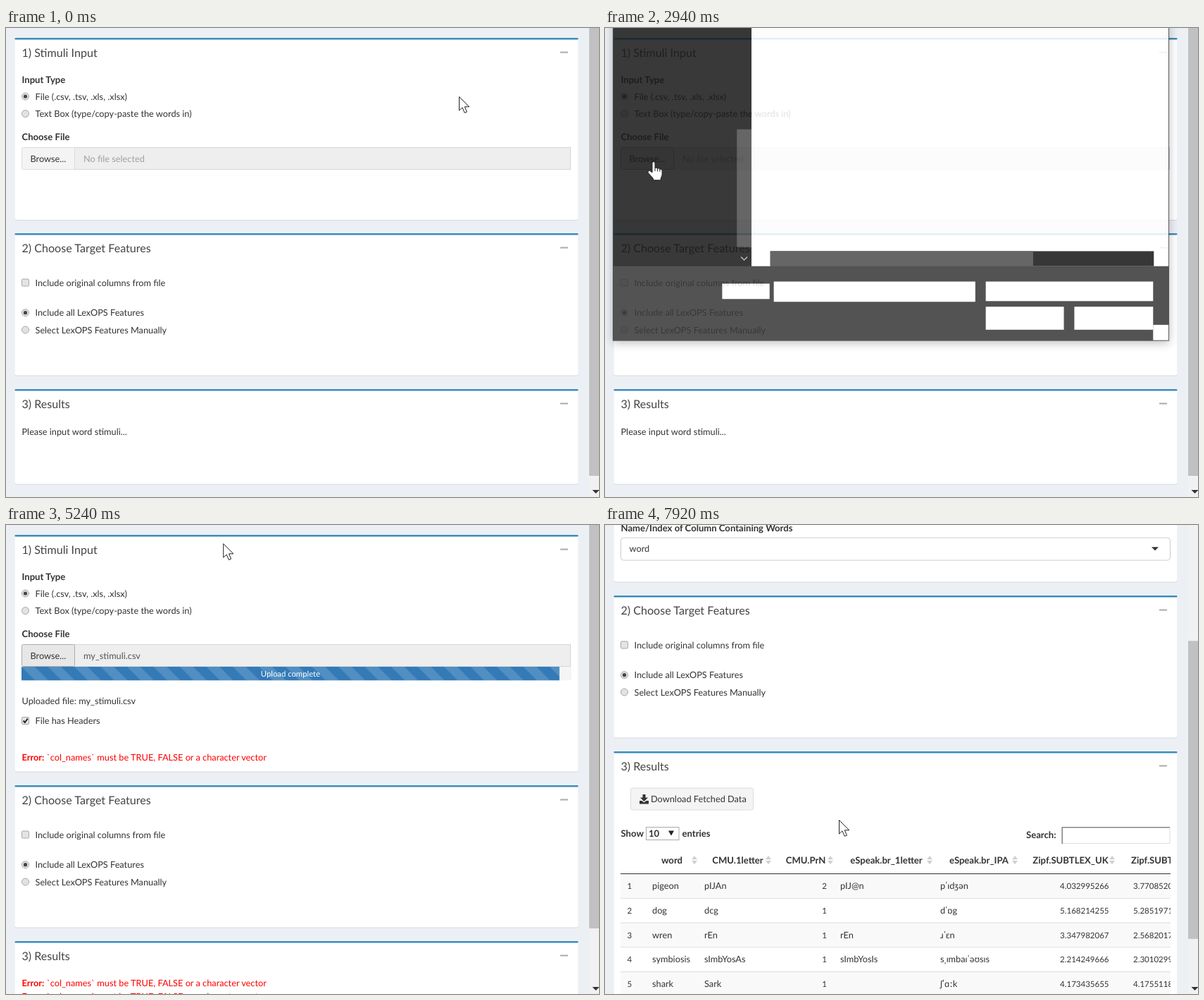
Animation, 842 px wide and 665 px high, one loop 8 s. Source, as an HTML page:

```html
<!DOCTYPE html>
<html lang="en">
<head>
<meta charset="utf-8">
<style>
  html, body { margin: 0; width: 100%; height: 100%; overflow: hidden; background: #ecf0f5; }
  #stage { display: block; width: 842px; height: 665px; font: 12.75px Lato, "Noto Sans", sans-serif; fill: #333; }
  text { text-rendering: geometricPrecision; white-space: pre; }
  .title { font-size: 16.1px; fill: #444; }
  .bold { font-weight: bold; font-size: 13.1px; }
  .small { font-size: 11.3px; fill: #fff; }
  .number { font-size: 11.5px; }
  .error { fill: #f00; }
  .dark { font: 14.4px "Open Sans", "Noto Sans", sans-serif; fill: #fff; }
</style>
</head>
<body>
<svg id="stage" viewBox="0 0 842 665"></svg>
<script>
const stage = document.getElementById('stage');
const LOOP = 8000;

// Moments at which the interface changes
const HOVER = 1330, BUSY = 2130, OPEN = 2785, PAINT = 3000, CLICK = 4190, CLOSE = 4390,
      UPLOAD = 4730, PARSED = 5010, READY = 5600, SCROLL = 6670, SCROLL_END = 7460;

const clamp = v => Math.max(0, Math.min(1, v));
const easeOut = (p, n = 2) => 1 - (1 - clamp(p)) ** n;

// y is the vertical middle of the capitals
const text = (x, y, s, cls = '', extra = '') =>
  `<text x="${x}" y="${y + (cls.includes('title') ? 5.9 : cls.includes('dark') ? 5.2 : 4.5)}" class="${cls}" ${extra}>${s}</text>`;
const rect = (x, y, w, h, fill, extra = '') =>
  `<rect x="${x}" y="${y}" width="${w}" height="${h}" fill="${fill}" ${extra}/>`;
const frame = (x, y, w, h, fill, stroke, extra = '') =>
  rect(x + .5, y + .5, w - 1, h - 1, fill, `stroke="${stroke}" ${extra}`);
const path = (d, fill, extra = '') => `<path d="${d}" fill="${fill}" ${extra}/>`;
const line = (d, color, width = 1, extra = '') => path(d, 'none', `stroke="${color}" stroke-width="${width}" ${extra}`);
const at = (x, y, body) => `<g transform="translate(${x} ${y})">${body}</g>`;
const END = 'text-anchor="end"', MID = 'text-anchor="middle"';

function radio(y, label, on) {
  return `<circle cx="27.5" cy="${y}" r="5" fill="#e2e2e2" stroke="#a6a6a6"/>` +
    (on ? `<circle cx="27.5" cy="${y}" r="2.6" fill="#444"/>` : '') + text(41.5, y, label);
}

function checkbox(y, label, on) {
  return frame(22, y - 5.5, 11, 11, '#e4e4e4', '#a6a6a6', 'rx="1.5"') +
    (on ? line(`M24.6 ${y}l2.2 2.5 4-5.5`, '#222', 2) : '') + text(41.5, y, label);
}

function panel(top, bottom, title, body) {
  return rect(12.5, top + 1, 800, bottom - top, '#d5d9de', 'rx="3"') +
    rect(12.5, top, 800, bottom - top, '#fff', 'rx="3"') +
    rect(12.5, top, 800, 2.5, '#3c8dbc', 'rx="1.2"') +
    text(22.5, top + 21, title, 'title') + rect(787, top + 19.5, 11, 2, '#aaa') + body;
}

const errorLine = y => text(22.5, y,
  '<tspan font-weight="bold">Error:</tspan> `col_names` must be TRUE, FALSE or a character vector', 'error');

function fileInput(t) {
  const hover = t > HOVER && t < READY, chosen = t >= CLOSE + 120;
  return text(22.5, 73.5, 'Input Type', 'bold') +
    radio(97, 'File (.csv, .tsv, .xls, .xlsx)', true) +
    radio(121.5, 'Text Box (type/copy-paste the words in)') +
    text(22.5, 154, 'Choose File', 'bold') +
    frame(97, 169, 705, 32, '#eee', '#d2d6de') +
    frame(22, 169, 76, 32, hover ? '#e7e7e7' : '#f4f4f4', hover ? '#adadad' : '#ddd', 'rx="2"') +
    text(34.5, 185, 'Browse...') +
    text(110, 185.5, chosen ? 'my_stimuli.csv' : 'No file selected', '', `fill="${chosen ? '#555' : '#a0a0a0'}"`);
}

function progress(t) {
  if (t < UPLOAD) return '';
  const w = 781 * easeOut((t - UPLOAD) / 600);
  return rect(22, 201, 781, 19.3, '#f5f5f5') +
    at(22, 201, rect(0, 0, w, 19.3, '#337ab7') + rect(0, 0, w, 19.3, 'url(#stripes)')) +
    (w > 90 ? text(22 + w / 2, 210, 'Upload complete', 'small', MID) : '');
}

function uploaded(t) {
  if (t < PARSED) return '';
  const head = text(22.5, 249.5, 'Uploaded file: my_stimuli.csv') + checkbox(277.5, 'File has Headers', true);
  if (t < READY) return head + errorLine(329.5);
  return head + text(22.5, 330, 'Name/Index of Column Containing Words', 'bold') +
    frame(22, 343.5, 781, 33, '#fff', '#ccc', 'rx="4"') + text(34.5, 359.5, 'word') +
    path('M776 357.3h10l-5 5z', '#333');
}

const headers = [['word', 95, 127], ['CMU.1letter', 188.5, 232], ['CMU.PrN', 285, 320],
  ['eSpeak.br_1letter', 399.5, 461], ['eSpeak.br_IPA', 531, 582], ['Zipf.SUBTLEX_UK', 661, 720]];
const rows = [
  ['pigeon', 'pIJAn', 2, 'pIJ@n', 'pˈɪdʒən', '4.032995266', '3.770852012'],
  ['dog', 'dcg', 1, '', 'dˈɒg', '5.168214255', '5.285197127'],
  ['wren', 'rEn', 1, 'rEn', 'ɹˈɛn', '3.347982067', '2.568201724'],
  ['symbiosis', 'sImbYosAs', 1, 'sImbYosIs', 'sˌɪmbaɪˈəʊsɪs', '2.214249666', '2.301029996'],
  ['shark', 'Sark', 1, '', 'ʃˈɑːk', '4.173435655', '4.175511803']];
const columns = [[67], [141], [315, 'number', END], [334], [476], [715.5, 'number', END], [750, 'number']];

// Coordinates relative to the top of the results panel
const results =
  frame(36, 51.5, 175, 32, '#f4f4f4', '#ddd', 'rx="3"') +
  path('M53.5 61h4v4.5h3.5l-5.5 5.5-5.5-5.5h3.5zM49 70h3.5l3 2.6 3-2.6H62v4.5H49z', '#333') +
  text(65, 67.5, 'Download Fetched Data') +
  text(22.5, 116.5, 'Show', 'bold') + frame(58, 107, 47.5, 19, '#fff', '#a9a9a9') +
  text(62, 116.5, '10', 'bold') + path('M90 112.5h8l-4 7z', '#222') +
  text(109.5, 116.5, 'entries', 'bold') + text(598, 118, 'Search:', 'bold') +
  rect(648.5, 107, 154, 24, '#fff') + line('M802 107v23.5H649', '#ddd') + line('M649.2 131V107.8H802', '#888', 1.6) +
  `<svg width="803" height="380">` +
  headers.map(([name, x, sort]) => text(x, 154, name, 'bold', MID) +
    path(`M${sort - 4} 153.2l4-5.2 4 5.2zM${sort - 4} 155l4 5.2 4-5.2z`, '#d0d0d0')).join('') +
  text(747, 154, 'Zipf.SUBTLEX_US', 'bold') +
  rows.map((row, i) => {
    const y = 173 + 34.75 * i;
    return rect(22, y, 781, 34.75, i % 2 ? '#fff' : '#f9f9f9') + rect(22, y, 781, 1, i ? '#ddd' : '#333') +
      text(31.5, y + 17.5, i + 1, 'number') +
      row.map((cell, c) => text(columns[c][0], y + 17.5, cell, ...columns[c].slice(1))).join('');
  }).join('') + '</svg>';

function page(t, scroll) {
  const [end1, top2] = t < PARSED ? [272, 291] : t < READY ? [349.5, 369] : [406.5, 426];
  const top3 = top2 + 221;
  const features = checkbox(top2 + 70, 'Include original columns from file') +
    radio(top2 + 112.7, 'Include all LexOPS Features', true) + radio(top2 + 137, 'Select LexOPS Features Manually');
  const output = t < PARSED
    ? text(22.5, top3 + 60.5, 'Please input word stimuli...', '', `opacity="${t > UPLOAD ? .35 : 1}"`)
    : t < READY ? errorLine(top3 + 59.5) + errorLine(top3 + 78) : at(0, top3, results);
  return at(0, -scroll,
    panel(14, end1, '1) Stimuli Input', fileInput(t) + progress(t) + uploaded(t)) +
    panel(top2, top2 + 201.5, '2) Choose Target Features', features) +
    panel(top3, t < READY ? top3 + 134.5 : top3 + 460, '3) Results', output));
}

function scrollbar(t, scroll) {
  const bottom = t < PARSED ? 635 : t < 5800 ? 572 : t < 6020 ? 533 : t < 6390 ? 496 : 394.5;
  const shift = scroll * .59;
  return rect(828, 0, 14, 665, '#f1f1f1') + rect(828, shift - 28, 14, bottom + 28, '#c1c1c1') +
    path('M832.5 655h10l-5 5z', '#333');
}

const icons = {
  pc: rect(5, 0, 13, 10, '#35a6e8', 'transform="skewY(8)"') + path('M0 13l9-3 8 4-8 3z', '#cfd8dd'),
  cube: path('M9 0l9 4v10l-9 4-9-4V4z', '#37b6e6') + path('M9 0l9 4-9 4-9-4z', '#a5e4f7') + path('M9 8l9-4v10l-9 4z', '#1583b8'),
  desktop: rect(0, 2, 18, 13, '#1a8fe8') + rect(0, 14, 18, 1.5, '#0c62b0'),
  document: path('M3 0h9l4 4v14H3z', '#f4f4f4') + line('M5 6h5M5 9h9M5 12h9M5 15h9', '#6b8ba8', 1.2),
  download: path('M6 1h6v7h5l-8 9-8-9h5z', '#2b95e6'),
  music: path('M8 0c1 4 6 4 5 10-1-3-2-3-3-4v8a4 3.4 0 1 1-2-3z', '#1c9df0'),
  picture: rect(0, 3, 18, 13, '#eee') + rect(1.5, 4.5, 15, 10, '#79bde8') + path('M1.5 14.5V11l5-3 10 4v2.5z', '#2e5f7c'),
  film: rect(1, 0, 17, 18, '#333') + line('M2.5 0v18M16.5 0v18', '#ddd', 1.6, 'stroke-dasharray="2"') +
    rect(4.5, 1, 10, 7, '#3b83bd') + rect(4.5, 10, 10, 7, '#d89b35'),
  drive: rect(1, 2, 8, 7, '#2ba5e0') + path('M0 11l6-2 12 4v3l-6 2-12-4z', '#c9cdd0'),
  network: '<circle cx="11" cy="7" r="7" fill="#46b4ea"/>' + path('M0 7l9 3v7l-9-3z', '#2785c4') + path('M8 2l5 2-1 5-5-3z', '#c4ecfb')
};
const places = [['cube', '3D Objects'], ['desktop', 'Desktop'], ['document', 'Documents'], ['download', 'Downloads'],
  ['music', 'Music'], ['picture', 'Pictures'], ['film', 'Videos'], ['drive', 'Lantern (C:)']];
const chevron = (x, y, color, w = 4) => line(`M${x - w / 2} ${y - 4}l${w} 4-${w} 4`, color, 1.5);
const chevronDown = (x, y, color, r = 4.5) => line(`M${x - r} ${y - r / 2}l${r} ${r} ${r}-${r}`, color, 1.5);

const tree = rect(8, 81, 175.5, 28.5, '#333') +
  chevronDown(21.5, 34, '#777') + at(40, 25, icons.pc) + text(62.5, 34, 'This PC', 'dark') +
  places.map(([icon, name], i) => {
    const y = 65 + 30.55 * i;
    return chevron(32, y, '#555') + at(49, y - 9, icons[icon]) + text(72.5, y, name, 'dark');
  }).join('') +
  chevron(21.5, 319.5, '#555') + at(40, 310, icons.network) + text(62.5, 319.5, 'Network', 'dark');

const shell = rect(7, -225, 798, 672, '#383838') + rect(8, -200, 200, 540, '#191919') +
  rect(185, 144, 21, 169, '#4d4d4d') + chevronDown(195.5, 329, '#aaa');
const hScroll = rect(233, 318.5, 550, 21.5, '#171717') + rect(233, 318.5, 377, 21, '#4d4d4d');

const unpainted = rect(206, -200, 598, 540, '#fff') + rect(205, 144, 1, 169, '#4d4d4d') + hScroll +
  [[164, 365, 68, 22], [238, 362, 289, 29], [542, 362, 240, 28], [542, 398, 112, 33], [669, 398, 113, 33], [782, 424, 22, 22]]
    .map(b => rect(...b, '#fff')).join('');

function painted(t) {
  const selected = t >= CLICK, over = t > 4060;
  let grip = '';
  for (let i = 0; i < 3; i++) for (let j = 0; j <= i; j++) grip += rect(799 - 4 * j, 434 + 4 * i, 2.5, 2.5, '#bbb');
  return tree + rect(208, -200, 1.5, 540, '#333') + rect(209.5, -200, 595, 540, '#202121') +
    rect(600, 0, 1, 3, '#666') + rect(772, 0, 1, 3, '#666') +
    (over ? rect(229, 10, 575, 28.5, selected ? '#777' : '#4d4d4d') : '') +
    rect(235, 16, 18, 18, '#1f7a48') + text(259.5, 25, 'my_stimuli.csv', 'dark', 'style="fill:#eee"') +
    text(608.5, 25, '8/4/2019 12:44 PM', 'dark', 'style="fill:#ddd"') +
    `<svg width="804" height="60">${text(781, 25, 'Table Text File', 'dark', 'style="fill:#ddd"')}</svg>` +
    rect(209, 318.5, 595, 21.5, '#171717') + hScroll +
    chevron(222, 329.5, '#aaa', -4) + chevron(792, 329.5, '#aaa') +
    text(165, 377, 'File name:', 'dark') + frame(238, 362, 289, 29, '#383838', '#eee') +
    (selected ? text(242, 377, 'my_stimuli.csv', 'dark') : '') + chevronDown(515, 376.5, '#ccc') +
    frame(542, 362, 240, 28.5, '#383838', '#a0a0a0') +
    `<svg width="757" height="400">${text(545.5, 377, 'Customised Files (*.text;*.txt;*.csv)', 'dark')}</svg>` +
    chevronDown(770, 376.5, '#ccc') +
    frame(543, 398.5, 111, 32, '#333', '#fff', 'stroke-width="1.8"') + text(598.5, 415, 'Open', 'dark', MID) +
    frame(670, 398.5, 111.5, 32, '#333', '#ccc', 'stroke-width="1.6"') + text(725, 415, 'Cancel', 'dark', MID) + grip;
}

function dialog(t) {
  const shown = t < CLOSE ? easeOut((t - OPEN) / 250) : 1 - easeOut((t - CLOSE) / 180);
  if (shown <= 0) return '';
  const scale = .93 + .07 * shown;
  return `<g opacity="${shown}" style="filter:drop-shadow(0 3px 7px rgba(0,0,0,.3))"
    transform="translate(406 110) scale(${scale}) translate(-406 -110)">${shell}${t < PAINT ? unpainted : painted(t)}</g>`;
}

// Pointer hotspot: time, x, y
const track = [[520, 643, 97], [640, 540, 140], [780, 380, 219], [980, 168, 205], [1260, 168, 205], [1390, 74.5, 194.5],
  [1950, 69, 189], [3320, 69, 189], [3500, 110, 300], [3640, 190, 364], [3900, 290, 150], [4140, 302, 29], [4800, 302, 29],
  [4960, 308, 25.5], [5240, 308, 25.5], [5800, 420, 349], [5830, 433.5, 370.5], [7640, 433.5, 370.5], [7720, 422, 309], [7920, 332, 418]];

function position(t) {
  const i = track.findIndex(k => k[0] > t);
  if (i < 1) return (i ? track[track.length - 1] : track[0]).slice(1);
  const [a, b] = [track[i - 1], track[i]], p = (t - a[0]) / (b[0] - a[0]);
  return [a[1] + (b[1] - a[1]) * p, a[2] + (b[2] - a[2]) * p];
}

const outline = 'stroke="#222" stroke-linejoin="round"';
const arrow = path('M.5 .5V20L5 15.9 8.2 23.3 11.4 22 8.3 14.7H14.7z', '#fff', outline);
const hand = at(-8.5, 0, path('M6.5 16V2.8C6.5 0 10.5 0 10.5 2.8V10C11 8.6 14 8.8 14 10.8 14.6 9.6 17.3 9.8 17.4 11.8 ' +
  '18 10.8 20.6 11 20.6 13.4V18.5C20.6 21 18.6 22.5 18.4 26.8H8.6C8 23 4 20.5 1 16.6-.4 14.6 2 12.6 4 14z', '#fff', outline) +
  line('M10.5 10v4M14 10.8v3.5M17.4 11.8v3', '#222'));

function pointer(t) {
  const isHand = t > HOVER && t < BUSY || t >= 2560 && t < 3340 || t >= 5830 && t < 7640;
  const turn = t < 2230 ? 0 : t < 2410 ? 110 : 220;
  const ring = t >= BUSY && t < 2560
    ? `<g transform="translate(18.5 -1) rotate(${turn})" fill="none" stroke-width="3.5">
        <circle r="8" stroke="#3f9fd8"/><path d="M0-8A8 8 0 0 1 8 0" stroke="#9be0f8"/></g>` : '';
  return at(...position(t), (isHand ? hand : arrow) + ring);
}

const defs = `<defs><pattern id="stripes" width="37.5" height="37.5" patternUnits="userSpaceOnUse">
  <path transform="scale(.9375)" d="M0 0H20L40 20V40zM0 20L20 40H0z" fill="#fff" opacity=".15"/></pattern></defs>`;

function draw(now) {
  const t = now % LOOP;
  const scroll = Math.round(326 * easeOut((t - SCROLL) / (SCROLL_END - SCROLL), 1.25));
  stage.innerHTML = defs + rect(0, 0, 842, 665, '#ecf0f5') + page(t, scroll) + scrollbar(t, scroll) + dialog(t) + pointer(t);
  requestAnimationFrame(draw);
}
requestAnimationFrame(draw);
</script>
</body>
</html>
```
